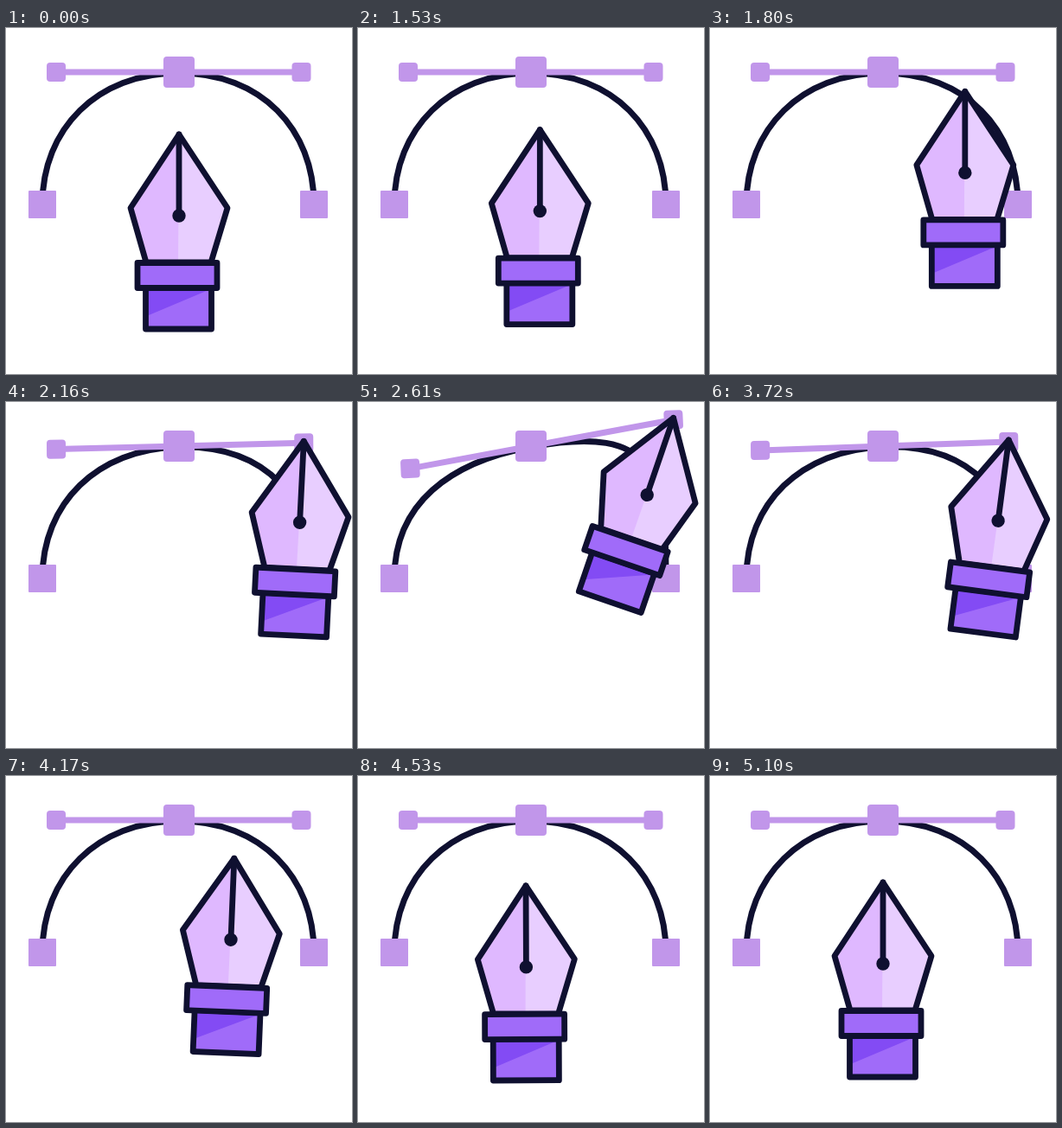
An HTML page with a canvas for the animation above (5.13 s loop, 400 by 400 pixels).

```html
<!DOCTYPE html>
<html lang="en">
<head>
<meta charset="utf-8">
<title>Pen tool</title>
<style>
  html, body { margin: 0; width: 100%; height: 100%; overflow: hidden; background: #fff; }
  canvas { display: block; width: 100vw; height: 100vh; object-fit: contain; }
</style>
</head>
<body>
<canvas id="stage" width="400" height="400"></canvas>
<script>
const ctx = document.getElementById('stage').getContext('2d');
const LOOP = 5130, STEP = 30;
const INK = '#0f1030', LILAC = '#c196ea';
const BODY = '#a06bf9', SHADE = '#834bf4', NIB_LEFT = '#dfb8ff', NIB_RIGHT = '#e8ceff';
const REST = { x: 200, y: 123 };
const GRIP = { x: 341.5, y: 49 };
const PULL = { x: 25, y: -33 };
const OVERSHOOT = .055;

const progress = (t, from, to) => Math.min(1, Math.max(0, (t - from) / (to - from)));
const ease = (t, from, to) => (1 - Math.cos(Math.PI * progress(t, from, to))) / 2;
const lerp = (a, b, p) => a + (b - a) * p;

// The pen flies to the handle, pulls it up, lets it back and returns home.
const flyOut = t => 1 - (1 - progress(t, 1500, 2010)) ** 1.25;
const pullAt = t => ease(t, 2000, 2740) - ease(t, 3135, 3920);
const flyHome = (t, from, calm) =>
  (1 + OVERSHOOT) * ease(t, from, from + 540) - OVERSHOOT * ease(t, 4440, calm);

function penPose(t) {
  const pull = pullAt(t), out = flyOut(t);
  const homeX = flyHome(t, 3893, 4720), homeY = flyHome(t, 3868, 5060);
  return {
    x: lerp(REST.x, GRIP.x, out - homeX) + PULL.x * pull,
    y: lerp(REST.y, GRIP.y, out - homeY) + PULL.y * pull,
    tilt: 14.8 * pull + 5.2 * (ease(t, 2000, 2500) - homeX)
  };
}

function square(x, y, size, radius, angle = 0) {
  ctx.save();
  ctx.translate(x, y);
  ctx.rotate(angle);
  ctx.fillStyle = LILAC;
  ctx.beginPath();
  ctx.roundRect(-size / 2, -size / 2, size, size, radius);
  ctx.fill();
  ctx.restore();
}

function polygon(points, fill) {
  ctx.beginPath();
  points.forEach(([x, y]) => ctx.lineTo(x, y));
  ctx.closePath();
  if (fill) {
    ctx.fillStyle = fill;
    ctx.fill();
  } else {
    ctx.stroke();
  }
}

function box(x, y, w, h, fill) {
  const corners = [[x, y], [x + w, y], [x + w, y + h], [x, y + h]];
  polygon(corners, fill);
  return corners;
}

function drawPath(pull) {
  const right = [341.5 + PULL.x * pull, 51 + PULL.y * pull];
  const angle = Math.atan2(right[1] - 51, right[0] - 200);
  const cos = Math.cos(angle), sin = Math.sin(angle);
  const left = [200 - 142 * cos, 51 - 142 * sin];
  const top = 52, reachL = 95, reachR = 95 + 60 * pull;

  ctx.strokeStyle = INK;
  ctx.lineWidth = 7;
  ctx.lineCap = 'butt';
  ctx.beginPath();
  ctx.moveTo(42, 204);
  ctx.bezierCurveTo(42, 117, 200 - reachL * cos, top - reachL * sin, 200, top);
  ctx.bezierCurveTo(200 + reachR * cos, top + reachR * sin, 356, 117 - 35 * pull, 356, 204);
  ctx.stroke();

  ctx.strokeStyle = LILAC;
  ctx.beginPath();
  ctx.moveTo(...left);
  ctx.lineTo(200, 51);
  ctx.lineTo(...right);
  ctx.stroke();

  square(...left, 22, 4, angle / 4);
  square(...right, 22, 4, angle / 4);
  square(200, 51, 36, 4);
  square(42, 204, 32, 1);
  square(356, 204, 32, 1);
}

function drawPen({ x, y, tilt }) {
  ctx.save();
  ctx.translate(x, y);
  ctx.rotate(tilt * Math.PI / 180);
  ctx.strokeStyle = INK;
  ctx.lineWidth = 6.8;
  ctx.lineJoin = ctx.lineCap = 'round';

  const nib = [[0, 0], [56, 85], [37, 148], [-38, 148], [-56, 85]];
  polygon(nib, NIB_RIGHT);
  polygon([[0, 0], [-1, 148], nib[3], nib[4]], NIB_LEFT);
  polygon(nib);

  const body = box(-38.5, 177, 76, 48, BODY);
  polygon([[-38.5, 177], [37.5, 177], [37.5, 178.5], [-38.5, 210.5]], SHADE);
  polygon(body);
  polygon(box(-48, 148.5, 92, 29, BODY));

  ctx.beginPath();
  ctx.moveTo(0, 0);
  ctx.lineTo(0, 94);
  ctx.stroke();
  ctx.fillStyle = INK;
  ctx.beginPath();
  ctx.arc(0, 94, 7.7, 0, Math.PI * 2);
  ctx.fill();
  ctx.restore();
}

function render(t) {
  ctx.fillStyle = '#fff';
  ctx.fillRect(0, 0, 400, 400);
  drawPath(pullAt(t));
  drawPen(penPose(t));
}

const start = performance.now();
function tick() {
  const t = (performance.now() - start) % LOOP;
  render(Math.floor(t / STEP) * STEP);
  requestAnimationFrame(tick);
}
tick();
</script>
</body>
</html>
```
